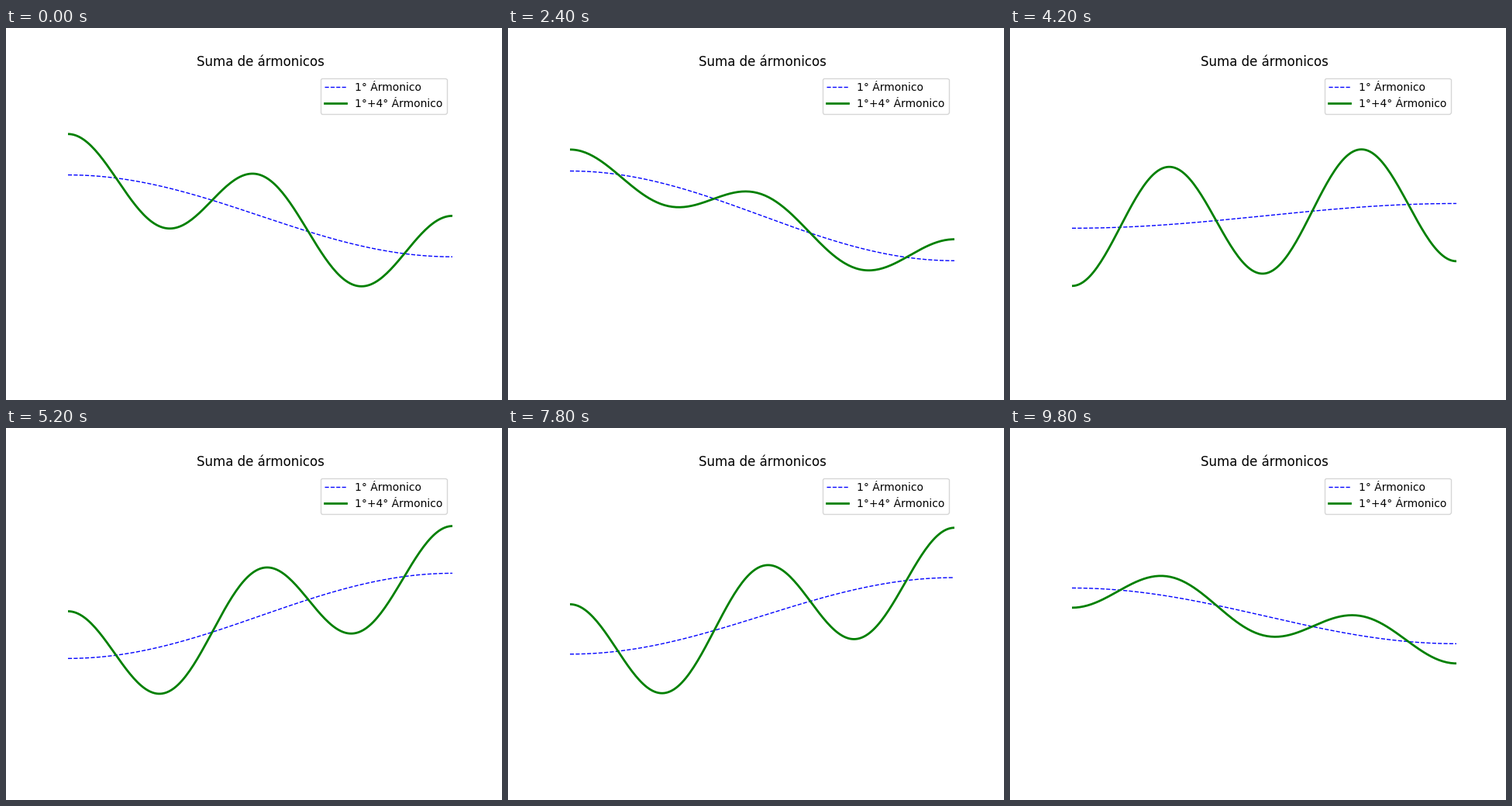
Write a matplotlib script that moves like this. It is 640 px wide and 480 px high and loops after 10000 ms.

```python
import numpy as np
import matplotlib.pyplot as plt
from matplotlib.animation import FuncAnimation

FRAMES = 50
STEP_MS = 200

x = np.linspace(0, np.pi, 200)
times = np.linspace(0, 6, FRAMES)


def harmonic(n, t):
    """Standing wave of order n at time t."""
    return (np.cos(n * t) + np.sin(n * t)) * np.cos(n * x)


plt.rcParams["font.family"] = "DejaVu Sans"
fig, ax = plt.subplots(figsize=(6.4, 4.8), dpi=100)
ax.set_xlim(0, np.pi)
ax.set_ylim(-3.5, 3.5)
ax.axis("off")
ax.set_title("Suma de ármonicos")

first, = ax.plot([], [], "b--", lw=1, label="1° Ármonico")
total, = ax.plot([], [], "g-", lw=2, label="1°+4° Ármonico")
ax.legend(loc="upper right")


def update(i):
    base = harmonic(1, times[i])
    first.set_data(x, base)
    total.set_data(x, base + harmonic(4, times[i]))
    return first, total


anim = FuncAnimation(fig, update, frames=FRAMES, interval=STEP_MS,
                     repeat=True, repeat_delay=0)
plt.show()
```
